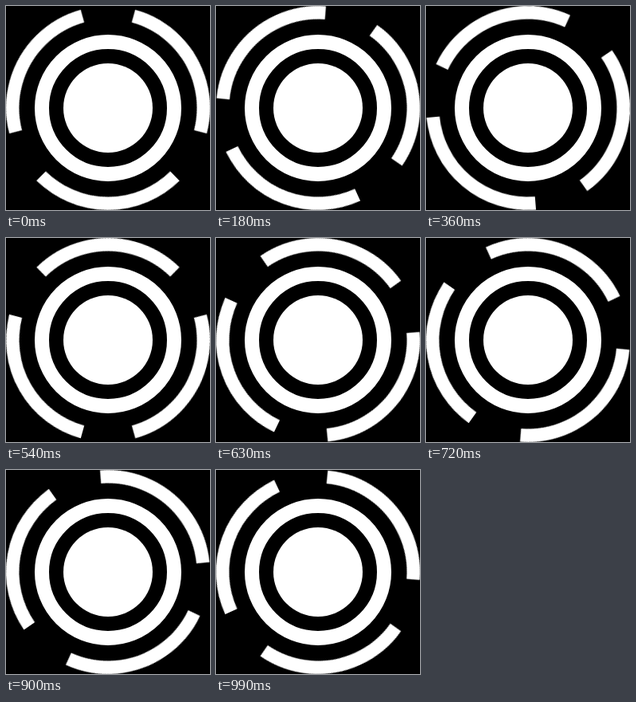
An HTML page that plays this animation: 256 by 256 pixels, repeating every 1080 ms.

```html
<!DOCTYPE html>
<html lang="en">
<head>
<meta charset="utf-8">
<title>Spinner</title>
<style>
  html, body {
    margin: 0;
    width: 100%;
    height: 100%;
    overflow: hidden;
    background: #000;
  }
  svg {
    display: block;
    width: 100%;
    height: 100%;
  }
  .ring {
    fill: none;
    stroke: #fff;
  }
  /* Three equal arcs: a third of a turn closes the loop */
  .arcs {
    transform-origin: 0 0;
    animation: turn 1080ms steps(12, end) infinite;
  }
  @keyframes turn {
    from { transform: rotate(0deg); }
    to { transform: rotate(120deg); }
  }
</style>
</head>
<body>
<svg viewBox="-128 -128 256 256">
  <circle r="56" fill="#fff"/>
  <circle class="ring" r="83" stroke-width="18"/>
  <g class="arcs">
    <circle class="ring" r="119.75" stroke-width="16.5" pathLength="360"
            stroke-dasharray="89 31" transform="rotate(45.5)"/>
  </g>
</svg>
</body>
</html>
```
